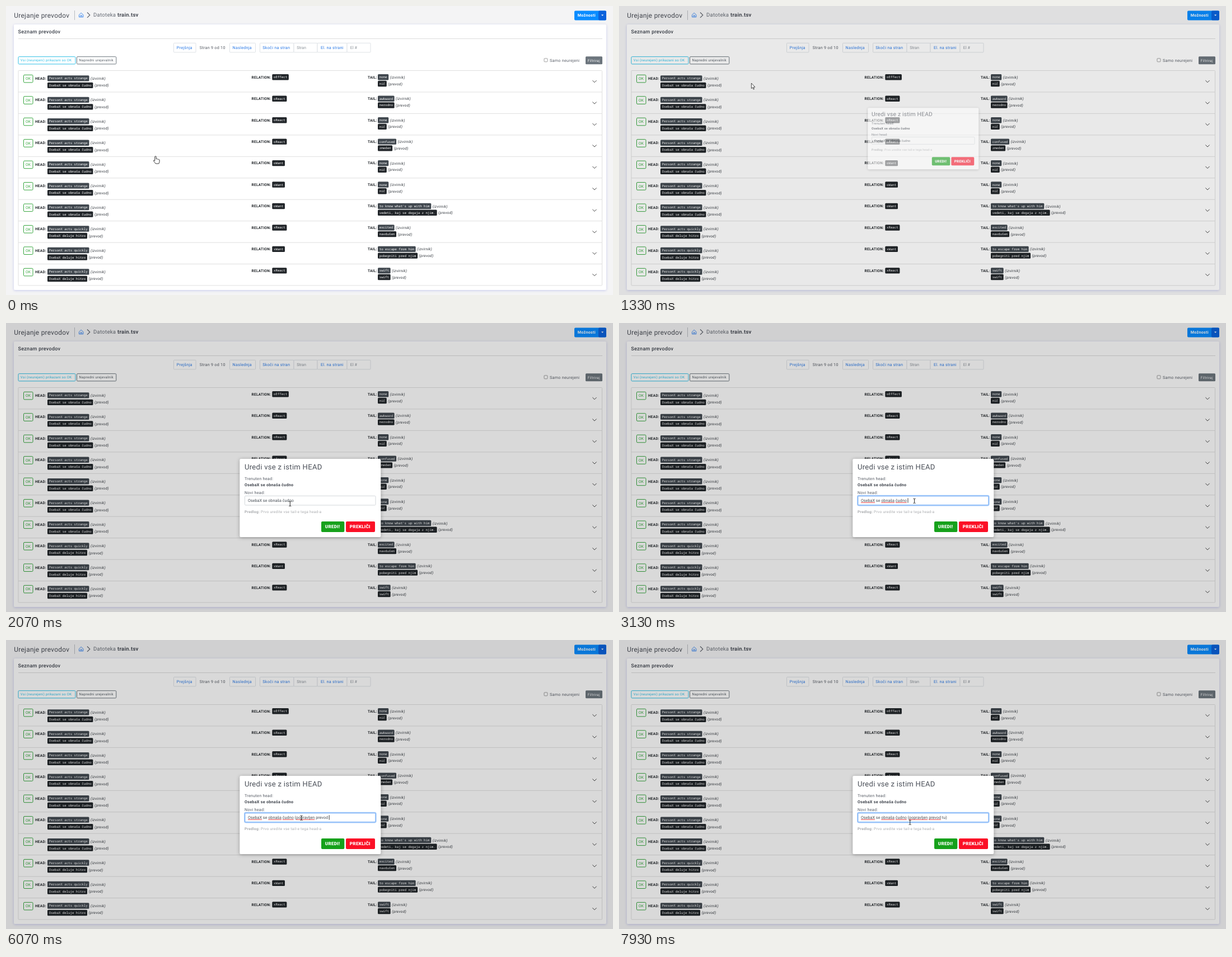
An HTML page for the animation above (8000 ms loop, 1084 by 517 pixels).

```html
<!DOCTYPE html>
<html lang="sl">
<head>
<meta charset="utf-8">
<title>Urejanje prevodov</title>
<style>
  html, body { margin: 0; width: 100%; height: 100%; overflow: hidden; background: #f4f4f5; }
  svg { display: block; }
  text { font-family: Roboto, sans-serif; letter-spacing: .27px; white-space: pre; text-rendering: geometricPrecision; }
  .plain { letter-spacing: 0; }
  .mono { font-family: "Noto Sans Mono", "Liberation Mono", monospace; letter-spacing: 0; }
  .i { font-style: italic; }
  .m { font-weight: 500; }
  .b { font-weight: 700; }
  .x { font-weight: 900; }
  #card { filter: drop-shadow(0 1px 2px rgba(90, 100, 220, .3)); }
  #panel { filter: drop-shadow(0 1px 3px rgba(0, 0, 0, .3)); }
</style>
</head>
<body>
<svg id="stage" width="1084" height="517" viewBox="0 0 1084 517"></svg>
<script>
const LOOP = 8000, FPS = 15;
const stage = document.getElementById('stage');

// Static drawing helpers
const text = (x, y, size, fill, str, cls = '') =>
  `<text x="${x}" y="${y}" font-size="${size}" fill="${fill}" class="${cls}">${str}</text>`;
const box = (x, y, w, h, fill, stroke = 'none', r = 0, extra = '') =>
  `<rect x="${x}" y="${y}" width="${w}" height="${h}" rx="${r}" fill="${fill}" stroke="${stroke}" ${extra}/>`;
const line = (d, stroke, width = 1) =>
  `<path d="${d}" fill="none" stroke="${stroke}" stroke-width="${width}"/>`;

const BLUE = '#2878e6', INK = '#212529', SOFT = '#41484f', BORDER = '#dee2e6';

function chip(x, y, str, fill, note = '') {
  const w = str.length * 3.456 + 5.4;
  return box(x, y, w, 10.4, fill, 'none', 1.5) +
    text(x + 2.7, y + 7.2, 5.76, '#fff', str, 'mono') +
    (note && text(x + w + 2.5, y + 7.7, 6.6, '#33383e', `(${note})`, 'i'));
}

const STRANGE = ['PersonX acts strange', 'OsebaX se obnaša čudno'];
const QUICK = ['PersonX acts quickly', 'OsebaX deluje hitro'];
const rows = [
  [STRANGE, 'oEffect', 'none', 'nič'],
  [STRANGE, 'oReact', 'awkward', 'nerodno'],
  [STRANGE, 'oReact', 'none', 'nič'],
  [STRANGE, 'oReact', 'confused', 'zmeden'],
  [STRANGE, 'oWant', 'none', 'nič'],
  [STRANGE, 'oWant', 'none', 'nič'],
  [STRANGE, 'oWant', "to know what's up with him", 'vedeti, kaj se dogaja z njim.'],
  [QUICK, 'xReact', 'excited', 'navdušen'],
  [QUICK, 'xWant', 'to escape from him', 'pobegniti pred njim'],
  [QUICK, 'xReact', 'swift', 'swift'],
];

function row([[head, headNew], relation, tail, tailNew], i) {
  const y = 115.5 + 38.45 * i;
  return (i ? line(`M22 ${y}H1065`, '#dfdfdf') : '') +
    box(31.5, y + 7.8, 16.5, 13.6, 'none', '#35a53d', 1.5) +
    text(35, y + 16.9, 6.6, '#35a53d', 'OK') +
    text(52, y + 16.4, 6.5, INK, 'HEAD:', 'b') +
    chip(74, y + 8.7, head, SOFT, 'izvirnik') +
    chip(74, y + 21.2, headNew, INK, 'prevod') +
    text(438.5, y + 14.1, 6.55, INK, 'RELATION:', 'b') +
    chip(475.3, y + 6.6, relation, INK) +
    text(646, y + 14.1, 6.55, INK, 'TAIL:', 'b') +
    chip(664, y + 6.6, tail, SOFT, 'izvirnik') +
    chip(664, y + 18.3, tailNew, INK, 'prevod') +
    line(`M1047.4 ${y + 17.6}l3.6 3.6 3.6 -3.6`, '#444');
}

const page =
  text(14.3, 21, 11.9, '#474b54', 'Urejanje prevodov') +
  line('M122.5 8V25', '#b9bbc0') +
  line('M130.5 15.8L134.2 12.3L137.9 15.8V19.8H130.5ZM133 19.6V16.8H135.4V19.6', '#2f80f0', .9) +
  line('M145 11.5L149.8 16.2L145 20.9', '#555a63', 1.1) +
  text(156, 19.4, 9.55, '#666b74', 'Datoteka <tspan class="b" fill="#474b54">train.tsv</tspan>') +
  box(1015, 8.5, 57, 17, '#0a8cff', 'none', 2) +
  box(1058, 8.5, 14, 17, '#0a62dc', 'none', 2) +
  text(1020.7, 19.4, 7.2, '#fff', 'Možnosti', 'b') +
  '<path d="M1063 15.6h4.2l-2.1 2.2z" fill="#fff"/>' +
  `<g id="card">${box(14, 33, 1058, 475, '#fff', 'none', 2)}</g>` +
  text(21.5, 48.6, 9, '#3b404a', 'Seznam prevodov', 'm') +
  line('M22 58.5H1065', '#dcdcdc') +
  [[299.5, 39.5], [399.5, 46], [453.5, 60.5], [514, 42], [556, 53], [609, 42]]
    .map(([x, w]) => box(x, 66.3, w, 16.6, '#fff', BORDER, 1)).join('') +
  text(304.8, 77.2, 7.2, BLUE, 'Prejšnja') +
  text(345.8, 77.2, 7.2, '#555a63', 'Stran 9 od 10') +
  text(404.6, 77.2, 7.2, BLUE, 'Naslednja') +
  text(458.3, 77.2, 7.2, BLUE, 'Skoči na stran') +
  text(519.2, 77.2, 7.2, '#8d949b', 'Stran', 'plain') +
  text(562, 77.2, 7.2, BLUE, 'El. na strani') +
  text(614.8, 77.2, 7.2, '#8d949b', 'El #', 'plain') +
  box(22, 90.7, 102, 13.2, '#fff', '#2fbfe6', 1.5) +
  text(25.8, 99.4, 6.15, '#2fbfe6', 'Vsi (neurejeni) prikazani so OK') +
  box(126.5, 90.7, 70.3, 13.2, '#fff', '#6c757d', 1.5) +
  text(130.6, 99.4, 6.2, '#555d65', 'Napredni urejevalnik') +
  box(961, 93.8, 6, 6, '#fff', '#8a8a8a', 1, 'stroke-width=".8"') +
  text(971, 99.5, 7.2, '#5a5f68', 'Samo neurejeni') +
  box(1035, 90.3, 30, 14, '#6c757d', 'none', 1.5) +
  text(1038.8, 99.6, 6.3, '#fff', 'Filtriraj') +
  box(22, 115.5, 1042.5, 384.5, 'none', '#dfdfdf', 1) +
  rows.map(row).join('');

const panel =
  `<g id="panel">${box(417.3, 243, 252, 140, '#fff', 'none', 2.5)}</g>` +
  text(426, 262.2, 13.1, '#4a4f58', 'Uredi vse z istim HEAD') +
  text(426, 281, 7.2, '#555a63', 'Trenuten head:') +
  text(426, 291.9, 7.2, '#3f444d', STRANGE[1], 'b') +
  text(426, 306, 7.2, '#555a63', 'Novi head:') +
  box(426.5, 309.3, 233.5, 16.6, '#fff', '#d3d7db', 1.5) +
  `<g id="ring">${box(426.3, 309.1, 234, 17, 'none', '#a9cdfb', 2, 'stroke-width="2.6"')}
    ${box(426.5, 309.3, 233.5, 16.6, 'none', '#7fb2f4', 1.5, 'stroke-width=".8"')}</g>` +
  text(432, 319.8, 7.24, '#495057', '', 'plain" id="field') +
  '<path id="marks" stroke="#f03030" stroke-width=".9"/>' +
  '<path id="caret" stroke="#111" stroke-width=".8"/>' +
  text(426, 340.2, 6.6, '#a9abae', '<tspan class="b">Predlog:</tspan> Prvo uredite vse tail-e tega head-a') +
  box(563, 355, 41.3, 19, '#16a11b', 'none', 2) +
  text(569.8, 367.4, 8.1, '#fff', 'UREDI!', 'x') +
  box(607, 355, 52, 19, '#fb1026', 'none', 2) +
  text(613.8, 367.4, 8.1, '#fff', 'PREKLIČI', 'x');

const pointers =
  `<path id="hand" fill="#fff" stroke="#222" stroke-width=".9" stroke-linejoin="round"
    d="M-1.2 .8Q0 -.6 1.2 .8V5Q2.6 4.4 3.4 5.4Q5 4.9 5.5 6Q7 5.7 7.1 7.2V9.6Q6.9 11.6 5.8 13.4H.2Q-1.6 11 -3.6 8.2Q-3.6 6.6 -1.2 8Z"/>
  <path id="arrow" fill="#fff" stroke="#222" stroke-width=".8" d="M0 0V9.6L2.2 7.6L3.7 11.2L5.1 10.6L3.6 7.1H6.6Z"/>
  <path id="beam" fill="none" stroke="#111" stroke-width=".9" d="M-2 -4H-.5L0 -3.5L.5 -4H2M0 -3.5V3.5M-2 4H-.5L0 3.5L.5 4H2"/>`;

stage.innerHTML = page + box(0, 0, 1084, 517, '#000', 'none', 0, 'id="shade"') +
  `<g id="dialog">${panel}</g>` + pointers;

const el = id => document.getElementById(id);
const clamp = v => Math.max(0, Math.min(1, v));
const mix = (a, b, p) => a + (b - a) * p;
const smooth = p => p * p * (3 - 2 * p);

// cubic-bezier(.25, .1, .25, 1)
function ease(x) {
  let lo = 0, hi = 1;
  for (let i = 0; i < 20; i++) {
    const s = (lo + hi) / 2;
    if (.75 * s * (1 - s) + s ** 3 < x) lo = s; else hi = s;
  }
  return .3 * lo * (1 - lo) ** 2 + 3 * lo * lo * (1 - lo) + lo ** 3;
}

// Ticks at which each key goes down; \b deletes the character before it
const KEYS = ' (popravljen prevod tu9\b)';
const KEY_TICKS = [46, 57, 61, 63, 66, 66, 67, 70, 73, 75, 76, 77, 78, 80, 82, 83, 87, 88, 89, 91, 93, 94, 98, 103, 106];
const FOCUS = 35;
const MISSPELT = [['OsebaX', 47], ['obnaša', 47], ['čudno', 47], ['popravljen', 79], ['prevod', 92]];

function drawField(tick) {
  let value = STRANGE[1], lastEdit = FOCUS;
  KEY_TICKS.forEach((at, i) => {
    if (tick < at) return;
    value = KEYS[i] === '\b' ? value.slice(0, -1) : value + KEYS[i];
    lastEdit = at;
  });
  const field = el('field');
  field.textContent = value.replaceAll(' ', '\u00a0');
  el('marks').setAttribute('d', MISSPELT.filter(([, at]) => tick >= at).map(([word]) => {
    const from = value.indexOf(word);
    return `M${field.getStartPositionOfChar(from).x} 321.3H${field.getEndPositionOfChar(from + word.length - 1).x}`;
  }).join(''));
  const x = 432.4 + field.getComputedTextLength();
  const visible = tick >= FOCUS && (tick - lastEdit) % 16 < 8;
  el('caret').setAttribute('d', visible ? `M${x} 313.3V321.7` : '');
  el('ring').setAttribute('opacity', clamp((tick - FOCUS + 1) / 3));
}

function pointerAt(tick) {
  if (tick < 20) {
    const p = smooth(clamp(tick / 7)), q = 1 - p;
    return ['hand', q * q * 267 + 2 * q * p * 196 + p * p * 236.4, mix(268.6, 138, p)];
  }
  if (tick < 32) {
    const p = smooth(clamp((tick - 22) / 9));
    const y = mix(138, 323.5, p);
    return [y > 309 ? 'beam' : 'arrow', mix(236.4, 507.3, p), y];
  }
  if (tick < 112) {
    const p = smooth(clamp((tick - 31) / 7));
    return ['beam', mix(507.3, 527.5, p), mix(323.5, 318.3, p)];
  }
  if (tick < 118) {
    const p = clamp((tick - 111) / 3);
    return ['beam', mix(527.5, 528.5, p), mix(318.3, 319.5, p)];
  }
  return tick < 119 ? ['beam', 524, 328] : ['beam', 519.7, 326.3];
}

function draw(tick) {
  const open = ease(clamp((tick * 1000 / FPS - 1234) / 300));
  const scale = .5 + open / 2;
  el('shade').setAttribute('opacity', .15 * open);
  const dialog = el('dialog');
  dialog.setAttribute('opacity', open);
  dialog.setAttribute('transform', `translate(543.3 ${313 - 354 * (1 - scale)}) scale(${scale}) translate(-543.3 -313)`);
  drawField(tick);
  const [shape, x, y] = pointerAt(tick);
  for (const id of ['hand', 'arrow', 'beam']) el(id).setAttribute('visibility', id === shape ? 'visible' : 'hidden');
  el(shape).setAttribute('transform', `translate(${x} ${y})`);
}

function loop() {
  draw(Math.floor((performance.now() % LOOP + 3.5) * FPS / 1000) % (LOOP * FPS / 1000));
  requestAnimationFrame(loop);
}
loop();
</script>
</body>
</html>
```
